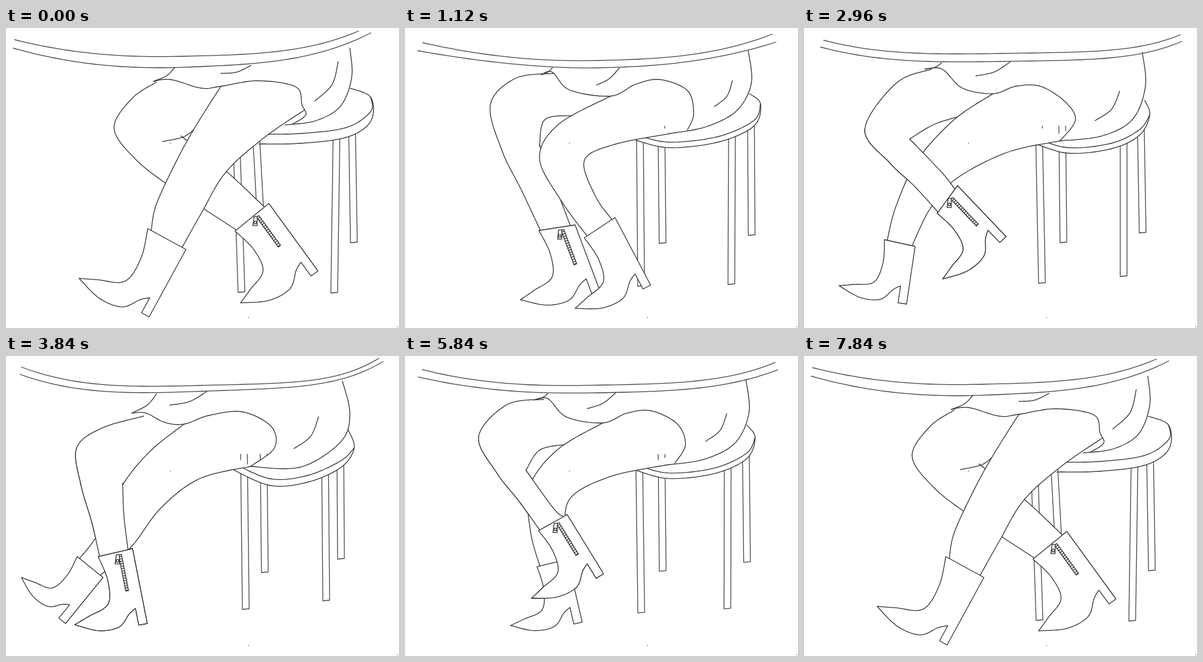
Write an HTML page with a canvas that moves like this. It is 640 px wide and 489 px high and loops after 7920 ms.

```html
<!DOCTYPE html>
<html lang="en">
<head>
<meta charset="utf-8">
<title>Crossing legs</title>
<style>
html, body { margin: 0; width: 100%; height: 100%; overflow: hidden; background: #fff; }
canvas { display: block; width: 640px; height: 489px; }
</style>
</head>
<body>
<canvas id="stage" width="640" height="489"></canvas>
<script>
const ctx = document.getElementById('stage').getContext('2d');
const STEP = 80, COUNT = 99, KEYS = [0, 14, 37, 48], SWAP = 20;
const INK = '#333', SOFT = '#484848';

// One row per key pose; all rows of a part blend into each other.
// Table edges: left x,y, right x,y, sag, squareness
const edgeTop = [[14,19, 574,5, 34, 2.3], [29,24, 598,10, 36, 2], [32,20, 613,11, 26, 3.1], [25,18, 607,4, 37, 3.2]];
const edgeLow = [[12,33, 594,8, 43, 2.2], [21,37, 604,23, 35, 1.7], [27,31, 615,22, 28, 3], [23,30, 614,9, 38, 3.1]];

// Stool posts, back ones first: top x, foot x, foot y
const posts = [
  [[401, 411, 345], [412, 414, 351], [415, 417, 350], [414, 416, 353]],
  [[558, 561, 350], [558, 559, 338], [543, 546, 334], [539, 540, 331]],
  [[369, 378, 431], [377, 379, 421], [377, 382, 416], [382, 385, 413]],
  [[533, 529, 432], [527, 526, 418], [515, 515, 405], [514, 516, 399]]];
const seat = [
  [560,98, 594,113, 594,152, 555,178, 480,188, 412,189],
  [561,107, 579,124, 568,160, 510,186, 430,195, 376,183],
  [555,118, 563,142, 546,175, 500,197, 430,204, 375,188],
  [557,120, 567,150, 545,182, 490,206, 430,211, 369,185]];
const seatDepth = [[16], [9], [9], [11]];

// Skirt
const side = [[275,64], [240,65], [224,57], [245,62]];
const hem = [
  [240,87, 268,84, 318,98, 350,95, 410,86, 472,96, 482,125, 488,142, 466,157],
  [222,76, 240,72, 268,101, 335,111, 375,92, 415,84, 460,102, 470,140, 460,166],
  [197,67, 225,67, 258,98, 308,107, 345,95, 385,95, 425,120, 442,150, 417,184],
  [205,93, 228,93, 258,108, 290,111, 330,97, 385,91, 432,115, 437,150, 398,180]];
const hip = [
  [560,33, 563,80, 545,127, 505,151, 455,158], [559,37, 564,90, 540,135, 490,161, 432,172],
  [551,40, 556,95, 535,149, 485,176, 417,184], [548,41, 560,95, 545,140, 480,181, 398,180]];
const foldA = [[350,74, 399,61], [312,93, 349,65], [280,78, 336,55], [267,80, 328,57]];
const foldB = [[503,119, 541,55], [504,128, 533,86], [474,151, 514,103], [469,151, 509,99]];

// Boots: cuff front, cuff back, heel, toe
const near = {
  front: [[312,155, 280,212, 245,287], [250,157, 219,212, 254,281], [245,149, 185,215, 150,290], [235,155, 190,210, 150,290]],
  rear: [[487,133, 420,179, 358,235, 318,302], [432,172, 340,190, 292,216, 310,274],
    [417,184, 330,203, 246,247, 205,295], [398,180, 315,200, 252,248, 205,310]],
  boot: [[231,327, 293,361, 233,471, 119,408], [292,342, 342,309, 400,419, 277,457],
    [131,345, 181,356, 167,450, 57,420], [116,327, 158,361, 97,436, 25,361]],
  ankle: [.09, .9]
};
const far = {
  front: [[245,88, 205,115, 176,163, 210,213, 270,260], [242,74, 180,82, 139,125, 158,200, 190,265],
    [208,67, 150,90, 99,165, 140,220, 180,258], [224,98, 155,118, 115,150, 122,210, 140,272]],
  rear: [[285,176, 358,233], [219,190, 257,290], [172,181, 225,236], [190,208, 192,260]],
  under: [[312,160, 290,177, 255,185], [276,143, 228,149, 219,193], [249,145, 210,158, 172,181], [205,203, 192,207, 180,209]],
  boot: [[373,331, 428,286, 508,396, 382,448], [218,330, 277,321, 318,430, 188,443],
    [217,302, 250,257, 329,340, 226,409], [150,327, 206,314, 230,436, 112,438]],
  ankle: [.04, .87], zip: true
};
// Bulges along a chord: share of the way, share of the length sideways
const INSTEP = [[.17, .145], [.42, .345], [.73, .235]];
const SOLE = [[.12, -.06], [.33, -.22], [.66, -.19]];

let seg = 0, u = 0;

const mix = (a, b, k) => a + (b - a) * k;
const mixPt = (p, q, k) => [mix(p[0], q[0], k), mix(p[1], q[1], k)];
const shift = (pts, dx, dy) => pts.map(([x, y]) => [x + dx, y + dy]);
const back = pts => pts.slice().reverse();
const values = part => part[seg].map((v, i) => mix(v, part[seg + 1][i], u));
const noise = n => { const s = Math.sin(n * 127.1 + 11.7) * 43758.5; return (s - Math.floor(s)) * 2 - 1; };

function points(part) {
  const v = values(part), out = [];
  for (let i = 0; i < v.length; i += 2) out.push([v[i], v[i + 1]]);
  return out;
}

// Samples a smooth curve through the points, ten steps per span.
function curve(pts) {
  const out = [pts[0]], at = i => pts[Math.max(0, Math.min(pts.length - 1, i))];
  for (let i = 0; i < pts.length - 1; i++) {
    const [a, b, c, d] = [at(i - 1), at(i), at(i + 1), at(i + 2)];
    for (let s = 1; s <= 10; s++) {
      const t = s / 10;
      out.push([0, 1].map(k => b[k] + t / 2 * (c[k] - a[k] + t * (2 * a[k] - 5 * b[k] + 4 * c[k] - d[k]
        + t * (3 * (b[k] - c[k]) + d[k] - a[k])))));
    }
  }
  return out;
}

function bulge(p, q, profile) {
  const dx = q[0] - p[0], dy = q[1] - p[1];
  return curve([p, ...profile.map(([t, n]) => [p[0] + dx * t - dy * n, p[1] + dy * t + dx * n]), q]);
}

function trace(pts) {
  ctx.beginPath();
  pts.forEach(p => ctx.lineTo(p[0], p[1]));
}
function line(pts, color = INK, width = 1.3) {
  trace(pts);
  ctx.strokeStyle = color;
  ctx.lineWidth = width;
  ctx.stroke();
}
function fill(pts) {
  trace(pts);
  ctx.fillStyle = '#fff';
  ctx.fill();
}
function shape(pts, color) {
  fill(pts);
  line(pts, color);
}

function drawEdge(part, drift) {
  const [x0, y0, x1, y1, sag, power] = values(part), pts = [];
  for (let s = 0; s <= 1.001; s += .02) {
    const far = Math.abs(2 * s - 1), p = s < .5 ? power : power * 1.45;
    pts.push([mix(x0, x1, s) + drift, mix(y0, y1, s) + sag * (1 - far ** p)]);
  }
  line(pts, SOFT);
}

function drawStool(dx, dy) {
  for (const post of posts) {
    const [top, foot, y] = values(post);
    shape(shift([[top, 160], [foot, y], [foot + 11, y - 1], [top + 11, 160]], dx, dy), SOFT);
  }
  const rim = shift(points(seat), dx, dy), [depth] = values(seatDepth);
  shape(curve(rim));
  line(curve([rim[1], ...shift(rim.slice(2), 0, -depth)]));
}

function drawBoot({ boot: [cuff, rear, heel, toe], zip }) {
  const dx = heel[0] - rear[0], dy = heel[1] - rear[1], len = Math.hypot(dx, dy);
  const ex = dx / len, ey = dy / len;
  const tip = [heel[0] - ey * 14, heel[1] + ex * 14];
  const arch = [tip[0] - ex * 28, tip[1] - ey * 28];
  shape([cuff, rear, heel, tip, ...bulge(arch, toe, SOLE), ...bulge(toe, cuff, INSTEP)]);
  if (zip) {
    const [x, y] = mixPt(cuff, rear, .62);
    drawZip([x + ex * 5, y + ey * 5], ex, ey, 60);
  }
}

function drawZip([x, y], ex, ey, len) {
  const across = s => [-2.3, 2.3].map(w => [x + ex * s - ey * w, y + ey * s + ex * w]);
  const [a, b] = across(0), [c, d] = across(len);
  line([a, c, d, b, a]);
  for (let s = 3; s < len; s += 4) line(across(s));
  shape([[x - 6, y], [x - 8, y + 15], [x - 1, y + 15], [x - 1, y], [x - 6, y]]);
  ctx.strokeRect(x - 6, y + 8, 3.5, 4);
}

// Bends a leg into the current pose; the lift grows towards the foot.
function pose(leg, lift, start = []) {
  const boot = shift(points(leg.boot), 0, -lift);
  const side = (pts, k) => curve([...pts.map(([x, y], i) => [x, y - lift * i / pts.length]),
    mixPt(boot[0], boot[1], leg.ankle[k])]);
  return { boot, zip: leg.zip, front: side([...start, ...points(leg.front)], 0), rear: side(points(leg.rear), 1) };
}

function drawLegs(farOnTop) {
  const arc = 32 * Math.sin(Math.PI * Math.min(u, 1));
  const a = pose(near, seg === 0 ? arc : 0, [points(hem)[3]]);
  const b = pose(far, seg === 1 ? arc : 0);
  const under = curve(points(far.under));

  fill([...b.front, ...back(b.rear), ...back(under)]);
  [b.front, under, b.rear].forEach(p => line(p));
  drawBoot(b);

  fill([...a.front, ...back(a.rear)]);
  line(a.front);
  line(a.rear);
  drawBoot(a);

  if (farOnTop) {
    const shin = b.front.slice(20);
    fill([...shin, ...back(b.rear)]);
    line(shin);
    line(b.rear);
    drawBoot(b);
  }
}

function drawSkirt() {
  const low = curve(points(hem)), rear = curve(points(hip));
  const edge = bulge(points(side)[0], low[0], [[.45, -.1]]);
  fill([...edge, ...low, ...back(rear)]);
  [edge, low, rear, bulge(...points(foldA), [[.5, .09]]), bulge(...points(foldB), [[.5, .14]])].forEach(p => line(p));
}

function draw(k) {
  seg = k < KEYS[1] ? 0 : k < KEYS[2] ? 1 : 2;
  u = (k - KEYS[seg]) / (KEYS[seg + 1] - KEYS[seg]);
  const loose = 2 * Math.sin(Math.PI * Math.min(u, 1));
  const drift = noise(k + 120) * loose * 1.5;

  ctx.fillStyle = '#fff';
  ctx.fillRect(0, 0, 640, 489);
  drawStool(noise(k) * loose, noise(k + 60) * loose * .6);
  drawLegs(k >= SWAP);
  drawSkirt();
  drawEdge(edgeTop, drift);
  drawEdge(edgeLow, drift);
  ctx.fillStyle = '#777';
  [[394, 471], [267, 187], [637, 486]].forEach(([x, y]) => ctx.fillRect(x, y, 1.5, 1.5));
}

ctx.lineJoin = ctx.lineCap = 'round';
const start = performance.now();
function tick() {
  const n = Math.floor(Math.max(0, performance.now() - start) / STEP) % COUNT;
  draw(Math.min(n, COUNT - 1 - n));
  requestAnimationFrame(tick);
}
tick();
</script>
</body>
</html>
```
